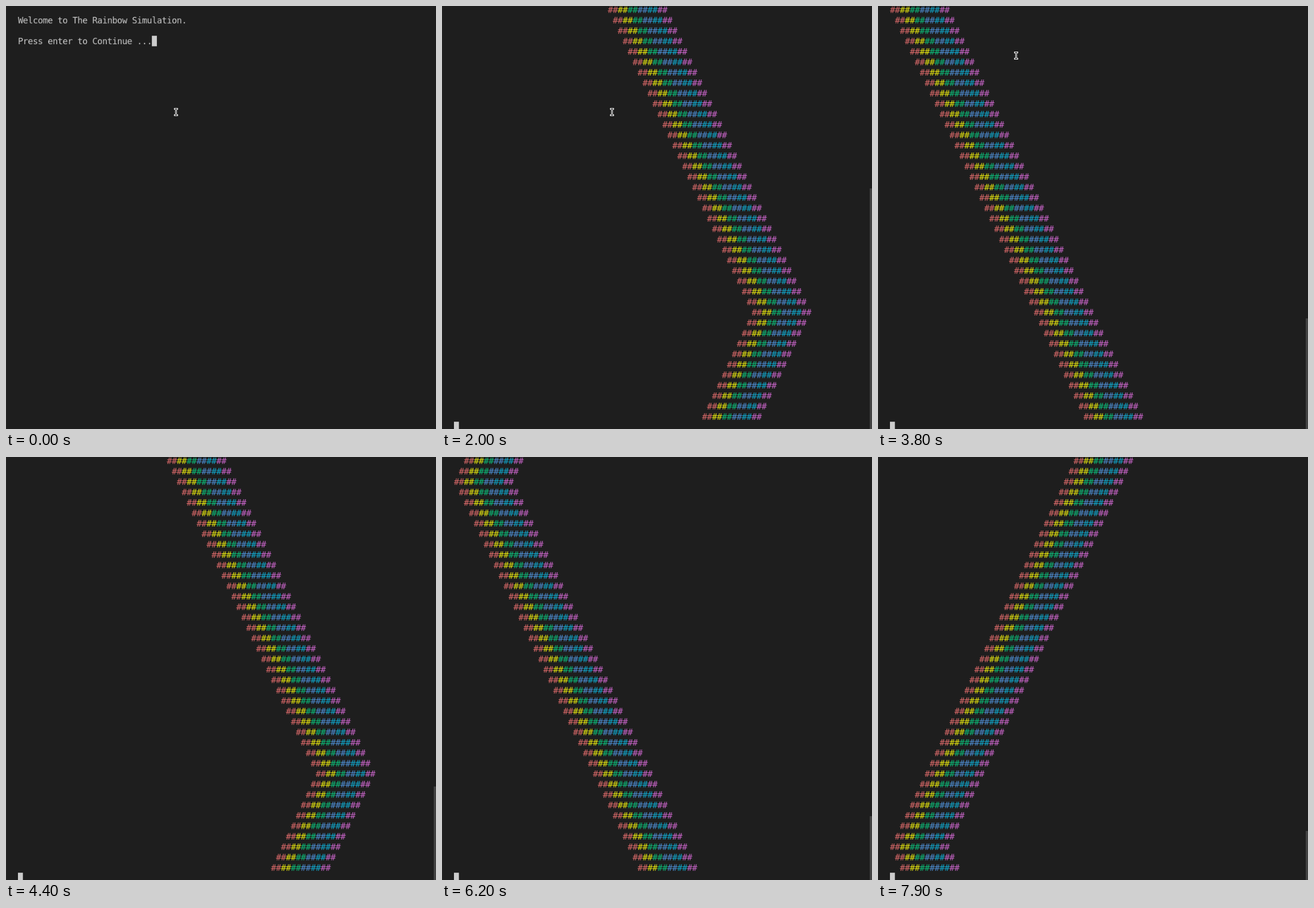
Animation, 755 px wide and 742 px high, one loop 8 s. Source, as an HTML page with a canvas:

```html
<!DOCTYPE html>
<html lang="en">
<head>
<meta charset="utf-8">
<title>Rainbow Simulation</title>
<style>
  html, body { margin: 0; width: 100%; height: 100%; overflow: hidden; background: #1e1e1e; }
  #stage { position: relative; width: 755px; height: 742px; overflow: hidden; }
  #stage > * { position: absolute; }
  #edge { left: 0; top: 0; width: 1px; height: 742px; background: #252525; }
  #screen { left: 0; top: 0; transform: scale(.8713); transform-origin: 0 0; }
  #slider { left: 751px; width: 4px; bottom: 0; background: #424242; }
  #pointer { left: 0; top: 0; overflow: visible; fill: none; }
</style>
</head>
<body>
<div id="stage">
  <div id="edge"></div>
  <canvas id="screen" width="867" height="852"></canvas>
  <div id="slider"></div>
  <svg id="pointer" width="1" height="1">
    <g id="beam">
      <path d="M-3.5 -5.5H3.5M0 -5.5V5.5M-3.5 5.5H3.5" stroke="#fff" stroke-width="3"/>
      <path d="M-2.5 -5.5H2.5M0 -5.5V5.5M-2.5 5.5H2.5" stroke="#111" stroke-width="1"/>
    </g>
  </svg>
</div>
<script>
const LOOP = 8000, TICK = 100;
const ROWS = 41, SWING = 60, FIRST = 4;
// The terminal grid in its own whole pixels; CSS scales the canvas to the stage.
const CELL = { w: 10, h: 21, x: 24, y: -3, baseline: 17 };
const TEXT = '#cccccc';
const intro = ['', 'Welcome to The Rainbow Simulation.', '', 'Press enter to Continue ...'];
const band = ['#db6a6a', '#e5e510', '#0dbc79', '#4e8ed3', '#11a8cd', '#c965c9'];

// [tick, index of the newest rainbow line]
const pace = [[6, 1], [13, 36], [14, 40], [20, 70], [30, 119], [50, 219], [62, 277], [77, 353], [79, 362]];

const [screenEl, slider, beam] = ['screen', 'slider', 'beam'].map(id => document.getElementById(id));
const ctx = screenEl.getContext('2d');
ctx.font = '17.5px "DejaVu Sans Mono", monospace';

function newestLine(tick) {
  if (tick < pace[0][0]) return -1;
  const i = Math.max(1, pace.findIndex(p => p[0] >= tick));
  const [t0, n0] = pace[i - 1], [t1, n1] = pace[i];
  return Math.round(n0 + (n1 - n0) * (tick - t0) / (t1 - t0));
}

function indent(n) {
  const phase = n % (2 * SWING);
  return Math.min(phase, 2 * SWING - phase);
}

const cellX = col => CELL.x + col * CELL.w;
const cellY = row => CELL.y + row * CELL.h;

function print(text, col, row, color) {
  ctx.fillStyle = color;
  [...text].forEach((ch, i) => ctx.fillText(ch, cellX(col + i), cellY(row) + CELL.baseline));
}

function printLine(i, row, newest) {
  const n = i - FIRST;
  if (n < 0) print(intro[i], 0, row, TEXT);
  else if (n <= newest) band.forEach((color, k) => print('##', indent(n) + 2 * k, row, color));
}

function draw(tick) {
  const newest = newestLine(tick), waiting = newest < 0;
  const cursorLine = waiting ? FIRST - 1 : FIRST + newest + 1;
  const cursorCol = waiting ? intro[FIRST - 1].length : 0;
  const scroll = Math.max(0, cursorLine - ROWS + 1);

  ctx.clearRect(0, 0, screenEl.width, screenEl.height);
  for (let row = 0; row < ROWS; row++) printLine(row + scroll, row, newest);
  ctx.fillStyle = TEXT;
  ctx.fillRect(cellX(cursorCol), cellY(cursorLine - scroll), CELL.w, CELL.h);

  slider.style.display = scroll ? 'block' : 'none';
  slider.style.top = Math.max(0, Math.round(744.7 - 32700 / (newest + 7))) + 'px';

  const [x, y] = tick < 38 ? [298.5, 186] : [242.5, 87];
  beam.setAttribute('transform', `translate(${x} ${y})`);
  beam.style.display = tick < 39 ? '' : 'none';
}

let shown = -1;
function frame() {
  const tick = Math.floor(performance.now() % LOOP / TICK);
  if (tick !== shown) draw(shown = tick);
  requestAnimationFrame(frame);
}
frame();
</script>
</body>
</html>
```
